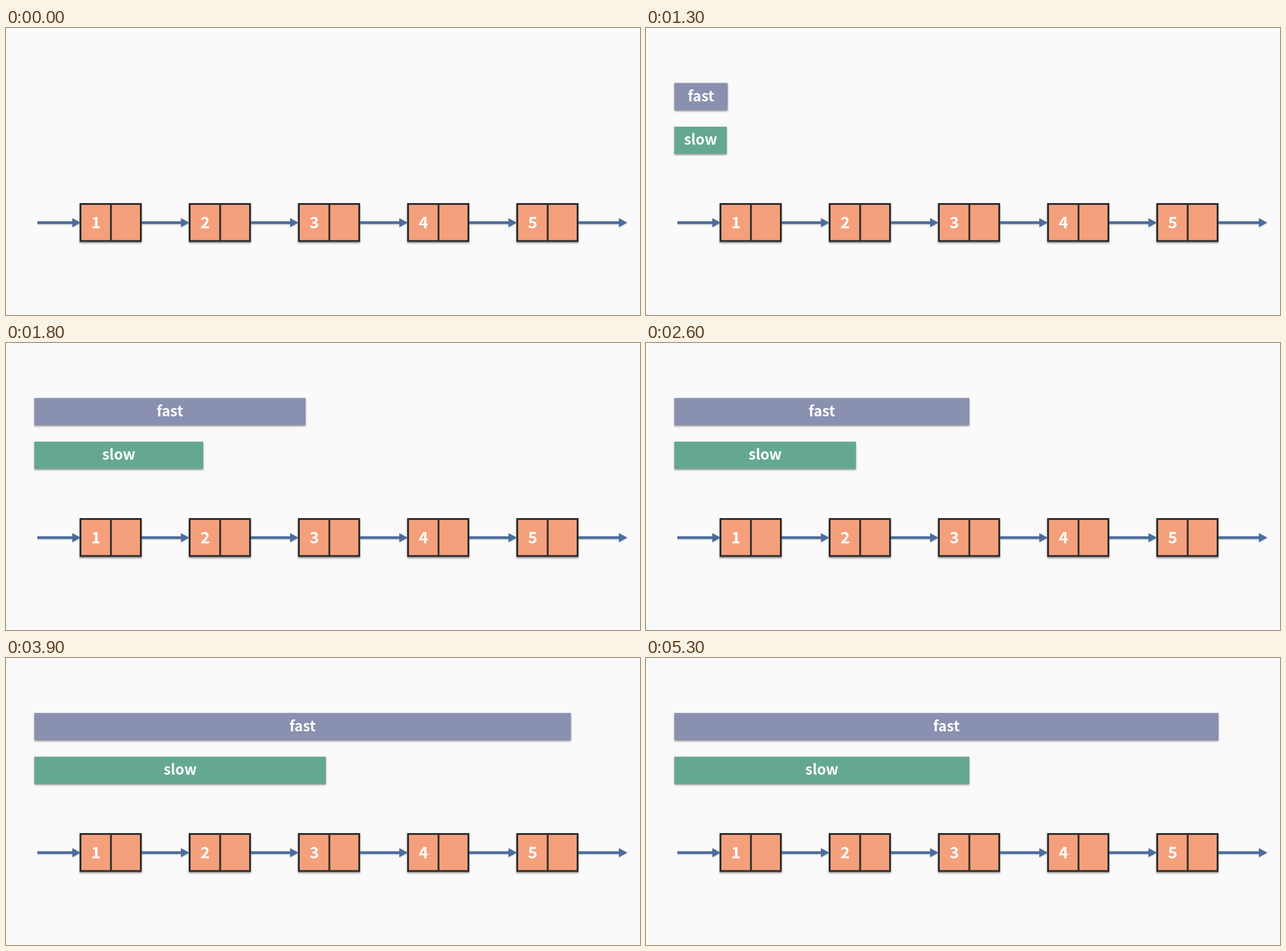
Recreate the animation shown at these times as an HTML page. Size 1051 by 477 pixels, loop 5800 ms.

```html
<!DOCTYPE html>
<html lang="en">
<head>
<meta charset="utf-8">
<title>Fast and slow pointers</title>
<style>
  html, body { margin: 0; width: 100%; height: 100%; overflow: hidden; background: #fafafa; }
  svg { display: block; width: 1051px; height: 477px; }
  text { font: bold 24px "Noto Sans CJK SC", "Noto Sans CJK JP", "Noto Sans CJK", "Noto Sans", sans-serif; fill: #fff; text-anchor: middle; }
  .digit { font-size: 26.67px; }
  .cell { fill: #f5a07c; stroke: #2a2d2e; stroke-width: 3; }
  .arrow line { stroke: #4c6c9c; stroke-width: 4.5; }
  .arrow path { fill: #4c6c9c; }
  .node, .bar { filter: drop-shadow(0 2px 1.7px rgba(0, 0, 0, .42)); }
  .arrow { filter: drop-shadow(0 1px 1px rgba(0, 0, 0, .22)); }
</style>
</head>
<body>
<svg id="stage" viewBox="0 0 1051 477"></svg>
<script>
const LOOP = 5800, STEP = 100, MOVE = 820;
const MOVE_STARTS = [1286, 3262];
const BAR_LEFT = 47, NODE_GAP = 181;
const stage = document.getElementById('stage');

function add(parent, tag, attrs, text = '') {
  const el = document.createElementNS('http://www.w3.org/2000/svg', tag);
  for (const key in attrs) el.setAttribute(key, attrs[key]);
  el.textContent = text;
  return parent.appendChild(el);
}

function addNode(i) {
  const x = 123.5 + i * NODE_GAP;
  const node = add(stage, 'g', { class: 'node' });
  add(node, 'rect', { class: 'cell', x, y: 292.5, width: 100, height: 61.5 });
  add(node, 'line', { class: 'cell', x1: x + 50.5, x2: x + 50.5, y1: 292.5, y2: 354 });
  add(stage, 'text', { class: 'digit', x: x + 25.5, y: 332.5 }, i + 1);
}

function addArrow(from, tip) {
  const arrow = add(stage, 'g', { class: 'arrow' });
  add(arrow, 'line', { x1: from, x2: tip - 12, y1: 323.5, y2: 323.5 });
  add(arrow, 'path', { d: `M${tip} 323.5l-14 -7.5v15z` });
}

// widths: at rest, after the first move, after the second move
function addBar(label, y, fill, widths) {
  const group = add(stage, 'g', { class: 'bar' });
  const rect = add(group, 'rect', { x: BAR_LEFT, y, height: 45, fill });
  const text = add(stage, 'text', { y: y + 30.3 }, label);
  return { group, rect, text, widths };
}

for (let i = 0; i < 5; i++) addNode(i);
addArrow(52, 124);
for (let i = 0; i < 5; i++) addArrow(225 + i * NODE_GAP, 304 + i * NODE_GAP + (i === 4 ? 2 : 0));

const bars = [
  addBar('fast', 91.3, '#8990b0', [85, 489, 902]),
  addBar('slow', 164, '#65a891', [85, 301, 489]),
];

const clamp = v => Math.min(1, Math.max(0, v));

// cubic-bezier(.25, .1, .25, 1), solved by bisection
function ease(u) {
  if (u <= 0 || u >= 1) return clamp(u);
  let lo = 0, hi = 1;
  for (let i = 0; i < 24; i++) {
    const s = (lo + hi) / 2;
    if (.75 * s * (1 - s) + s ** 3 < u) lo = s; else hi = s;
  }
  const s = lo, r = 1 - s;
  return .3 * s * r * r + 3 * s * s * r + s ** 3;
}

function draw(now) {
  const t = Math.floor(now % LOOP / STEP) * STEP;
  const opacity = t < 500 ? 0 : clamp((t - 400) / 333);
  const [first, second] = MOVE_STARTS.map(start => ease((t - start) / MOVE));
  for (const { group, rect, text, widths: [a, b, c] } of bars) {
    const width = a + (b - a) * first + (c - b) * second;
    rect.setAttribute('width', width);
    text.setAttribute('x', BAR_LEFT + width / 2);
    group.setAttribute('opacity', opacity);
    text.setAttribute('opacity', opacity);
  }
}

const begin = performance.now();
function tick() {
  draw(performance.now() - begin);
  requestAnimationFrame(tick);
}
tick();
</script>
</body>
</html>
```
